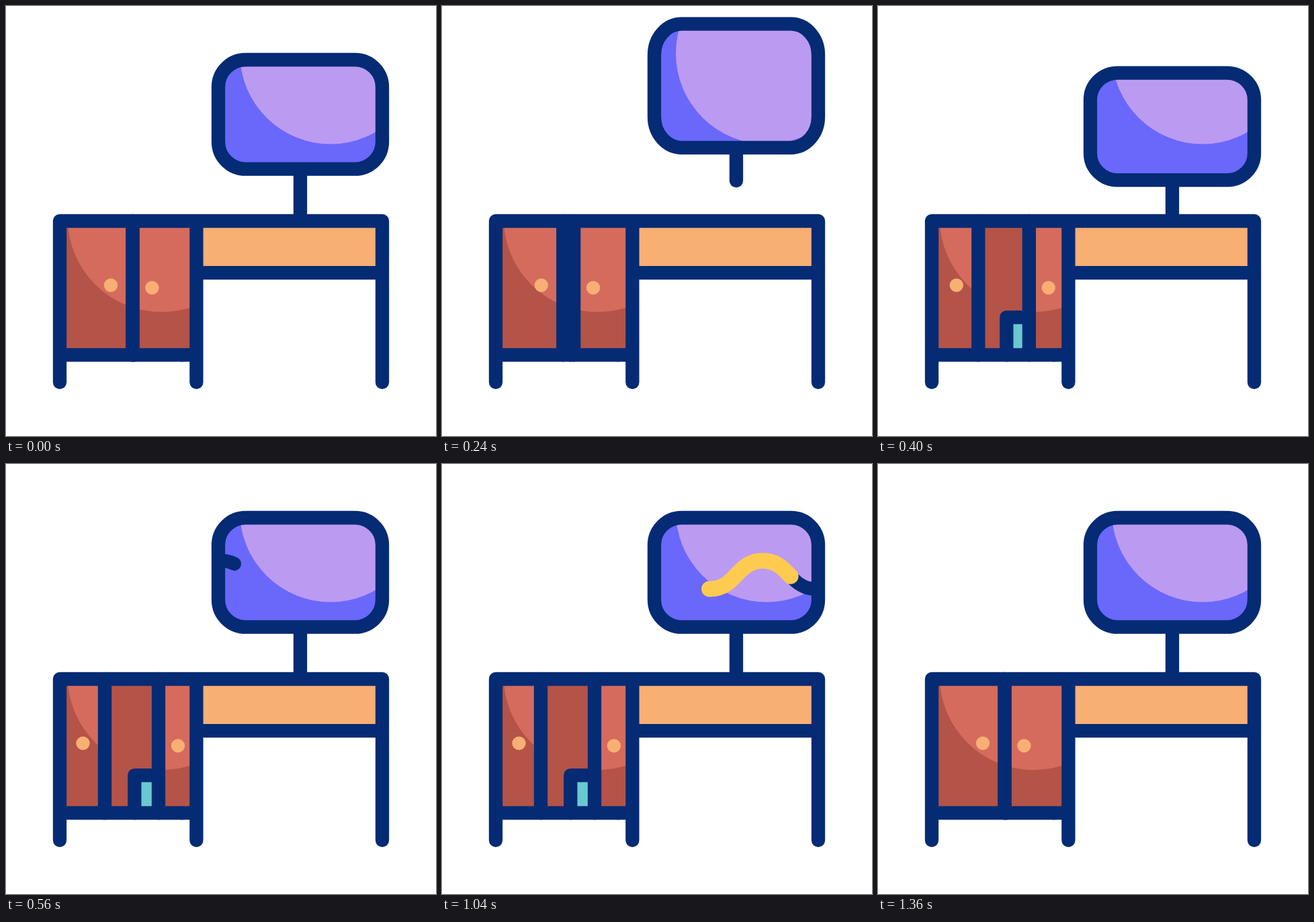
An HTML page that plays this animation: 640 px wide and 640 px high, repeating every 1.48 s.

```html
<!DOCTYPE html>
<html lang="en">
<head>
<meta charset="utf-8">
<title>Desk</title>
<style>
  html, body { margin: 0; width: 100%; height: 100%; overflow: hidden; background: #fff; }
  svg { display: block; width: 100%; height: 100%; }
  .line { fill: none; stroke: #042b74; stroke-width: 20.33; stroke-linecap: round; stroke-linejoin: round; }
  .gold { stroke: #fecb50; stroke-width: 23.4; }
  .dark { fill: #b45347; }
  .light { fill: #d56b5d; }
  .tan { fill: #f7af74; }
</style>
</head>
<body>
<svg viewBox="0 0 640 640">
  <defs>
    <clipPath id="screenClip"><rect class="body" x="316" width="244" rx="40.7"/></clipPath>
    <clipPath id="leftClip"><rect id="leftArea" x="80" y="320" height="199"/></clipPath>
    <clipPath id="rightClip"><rect id="rightArea" y="320" height="199"/></clipPath>
  </defs>

  <!-- monitor -->
  <path id="stand" class="line"/>
  <rect class="body" x="316" width="244" rx="40.7" fill="#6a67fb"/>
  <circle cx="483" cy="70.5" r="135" fill="#bb9af2" clip-path="url(#screenClip)"/>
  <path id="wave" class="line" pathLength="1"/>
  <path id="goldWave" class="line gold" pathLength="1"/>
  <rect class="body line" x="316" width="244" rx="40.7"/>

  <!-- cabinet inside -->
  <rect class="dark" x="80" y="320" width="203" height="199"/>
  <path class="line" d="M191.3 519.3V463.3H262V519.3" style="fill:#68c9d1"/>

  <!-- doors -->
  <g clip-path="url(#leftClip)">
    <rect class="dark" x="80" y="320" width="203" height="199"/>
    <circle class="light" cx="231.5" cy="315.7" r="139.8"/>
  </g>
  <g clip-path="url(#rightClip)">
    <rect class="dark" x="80" y="320" width="203" height="199"/>
    <circle class="light" cx="231.5" cy="315.7" r="139.8"/>
  </g>
  <g id="left">
    <path class="line" d="M188.5 320V519.3"/>
    <circle class="tan" cx="156" cy="415.6" r="10.2"/>
  </g>
  <g id="right">
    <path class="line" d="M188.5 320V519.3"/>
    <circle class="tan" cx="217.4" cy="419.4" r="10.2"/>
  </g>

  <!-- desk -->
  <rect class="tan" x="283.4" y="320" width="276.6" height="77"/>
  <path class="line" d="M80 560V320H560V560M283.4 320V560M80 519.3H283.4M283.4 397.2H560"/>
</svg>
<script>
  const LOOP = 1480, STEP = 40;
  const $ = id => document.getElementById(id);
  const set = (el, attrs) => { for (const k in attrs) el.setAttribute(k, attrs[k]); };

  const ease = (t, from, to) => {
    const u = Math.min(1, Math.max(0, (t - from) / (to - from)));
    return u * u * (3 - 2 * u);
  };

  // keys: [time, value] pairs with an eased move between each
  const track = (t, keys) => keys.slice(1).reduce(
    (v, [time, value], i) => v + (value - keys[i][1]) * ease(t, keys[i][0], time), keys[0][1]);

  const TOP = [[120, 80], [240, 26.7], [360, 106.4], [480, 80]];
  const BOTTOM = [[120, 242.7], [240, 210.8], [360, 264.8], [480, 242.7]];
  const FOOT = [[120, 320], [240, 260], [360, 320]];
  const DOORS = [[160, 0], [440, 1], [1040, 1], [1320, 0]];

  const HALF = 78.75, RISE = 42;
  const bend = dy => `c${HALF / 2} 0 ${HALF / 2} ${dy} ${HALF} ${dy}`;
  const curve = `M320 144${bend(RISE)}${bend(-RISE)}${bend(RISE)}`;
  set($('wave'), { d: curve });
  set($('goldWave'), { d: curve });

  function trim(el, start, end) {
    const len = end - start;
    el.style.display = len > 0.0005 ? '' : 'none';
    set(el, { 'stroke-dasharray': `${Math.max(len, 0)} 2`, 'stroke-dashoffset': -start });
  }

  function draw(t) {
    const top = track(t, TOP), bottom = track(t, BOTTOM), height = bottom - top;
    for (const el of document.querySelectorAll('.body'))
      set(el, { y: top, height, ry: height / 4 });
    set($('stand'), { d: `M438 ${bottom}V${track(t, FOOT)}` });

    const open = track(t, DOORS), l = -41.5 * open, r = 38.5 * open;
    set($('left'), { transform: `translate(${l} 0)` });
    set($('right'), { transform: `translate(${r} 0)` });
    set($('leftArea'), { width: 108.5 + l });
    set($('rightArea'), { x: 188.5 + r, width: 94.5 - r });

    trim($('wave'), ease(t, 640, 1160), ease(t, 480, 960));
    trim($('goldWave'), ease(t, 840, 1360), ease(t, 680, 1160));
  }

  const begin = performance.now();
  function tick() {
    const t = (performance.now() - begin) % LOOP;
    draw(Math.floor(t / STEP) * STEP);
    requestAnimationFrame(tick);
  }
  draw(0);
  requestAnimationFrame(tick);
</script>
</body>
</html>
```
